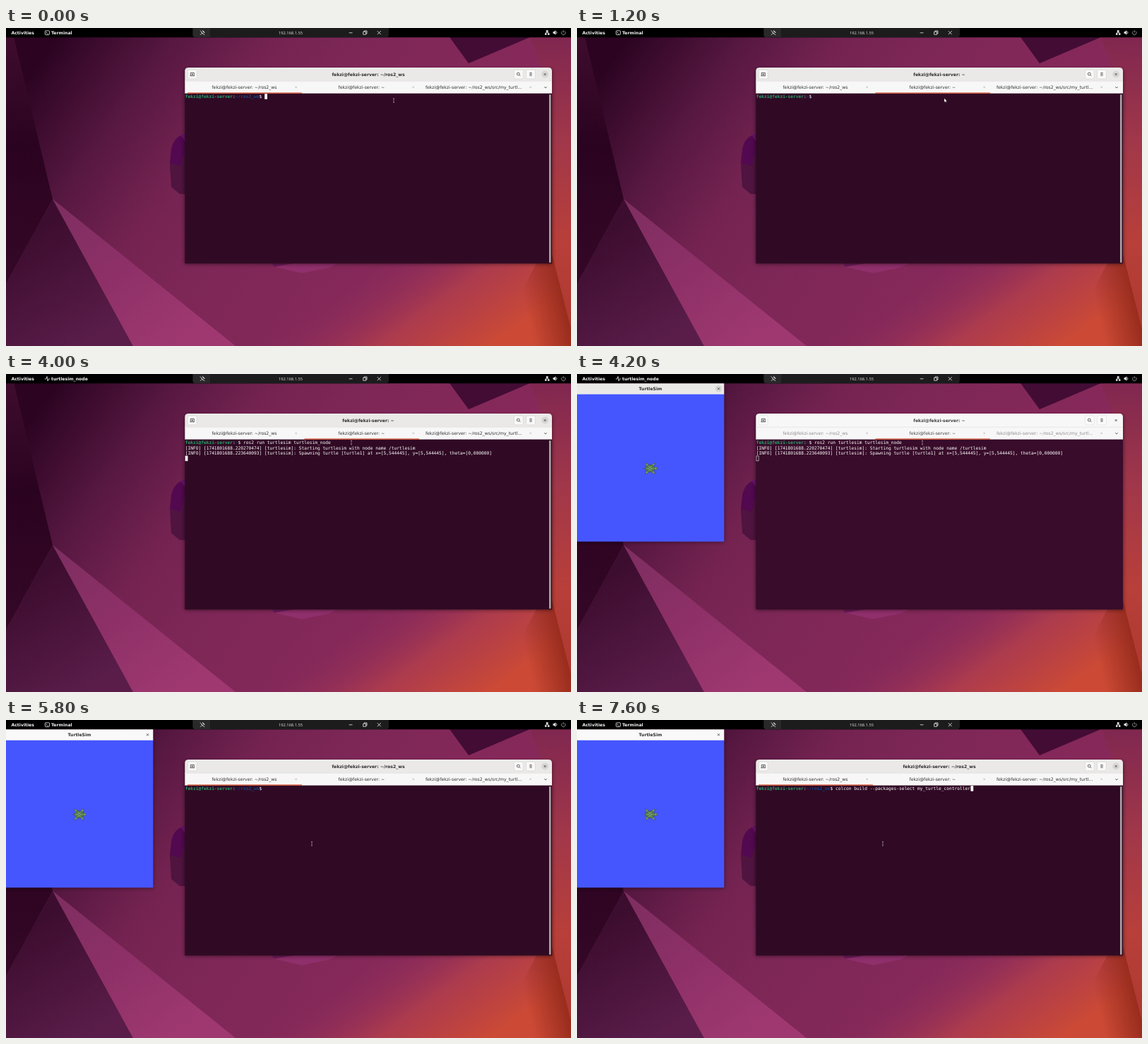
Recreate the animation shown at these times as an HTML page. Size 800 px wide and 450 px high, loop 8000 ms.

```html
<!DOCTYPE html>
<html lang="en">
<head>
<meta charset="utf-8">
<title>Terminal session</title>
<style>
html, body { margin: 0; width: 100%; height: 100%; overflow: hidden; background: #000; }
svg { display: block; width: 800px; height: 450px; }
text { white-space: pre; }
.ui { font: 6.13px "DejaVu Sans", sans-serif; fill: #2e2e2e; }
.bold { font-weight: bold; }
.mid { text-anchor: middle; }
.bar { fill: #f2f2f2; }
.remote { font: 5.7px "Open Sans", sans-serif; fill: #e4e4e4; text-anchor: middle; }
.mono { font: 6.23px "DejaVu Sans Mono", monospace; fill: #fff; }
.user { fill: #26a269; font-weight: bold; }
.path { fill: #12488b; font-weight: bold; }
.line { fill: none; stroke: #3d3d3d; stroke-width: .8; }
.white { fill: none; stroke: #eee; stroke-width: .8; }
.button { fill: #f8f8f8; stroke: #d2d0cf; stroke-width: .6; }
.away .ui { fill: #8d8d8d; }
.away .ui.keep { fill: #444; }
.away .head { fill: #f8f7f7; }
.away .round, .away .scroll { display: none; }
.away .screen { fill: #380c2a; }
.away .button { fill: #fafafa; stroke: #dedede; }
</style>
</head>
<body>
<svg viewBox="0 0 800 450" xmlns="http://www.w3.org/2000/svg">
  <defs>
    <linearGradient id="sky" gradientUnits="userSpaceOnUse" x1="40" y1="60" x2="520" y2="400">
      <stop offset="0" stop-color="#2c0422"/><stop offset=".22" stop-color="#551740"/>
      <stop offset=".42" stop-color="#742351"/><stop offset=".6" stop-color="#7d2757"/>
      <stop offset="1" stop-color="#87295a"/>
    </linearGradient>
    <linearGradient id="glow" gradientUnits="userSpaceOnUse" x1="336" y1="470" x2="447" y2="624">
      <stop offset="0" stop-color="#8d2c5c" stop-opacity="0"/><stop offset=".5" stop-color="#b03d4c" stop-opacity=".9"/>
      <stop offset="1" stop-color="#cc4a35"/>
    </linearGradient>
    <linearGradient id="night" gradientUnits="userSpaceOnUse" x1="0" y1="13" x2="0" y2="350">
      <stop offset="0" stop-color="#3f0c2d"/><stop offset=".45" stop-color="#2a0320"/><stop offset="1" stop-color="#340726"/>
    </linearGradient>
    <linearGradient id="slope" gradientUnits="userSpaceOnUse" x1="20" y1="300" x2="110" y2="450">
      <stop offset="0" stop-color="#3d0d2f"/><stop offset="1" stop-color="#5a1d4a"/>
    </linearGradient>
    <linearGradient id="ray" gradientUnits="userSpaceOnUse" x1="66" y1="242" x2="235" y2="450">
      <stop offset="0" stop-color="#7d2e61"/><stop offset=".5" stop-color="#8d3067"/><stop offset="1" stop-color="#9f3871"/>
    </linearGradient>
    <linearGradient id="ember" gradientUnits="userSpaceOnUse" x1="732" y1="380" x2="786" y2="368">
      <stop offset="0" stop-color="#93291b" stop-opacity="0"/><stop offset="1" stop-color="#93291b" stop-opacity=".9"/>
    </linearGradient>
    <linearGradient id="edge" gradientUnits="userSpaceOnUse" x1="0" y1="13" x2="0" y2="425">
      <stop offset="0" stop-color="#802750"/><stop offset=".35" stop-color="#a0374a"/>
      <stop offset=".7" stop-color="#b83f3a"/><stop offset="1" stop-color="#ae3930"/>
    </linearGradient>
    <filter id="soft" x="-10%" y="-10%" width="120%" height="125%"><feGaussianBlur stdDeviation="2.5"/></filter>
    <path id="cross" class="line" d="M-1.5-1.5 1.5 1.5M1.5-1.5-1.5 1.5"/>
    <path id="leg" d="M2-3.5Q3-8 7-7.5Q5.5-4 4-2Z"/>
  </defs>

  <g id="wallpaper">
    <rect width="800" height="450" fill="url(#sky)"/>
    <rect width="800" height="450" fill="url(#glow)"/>
    <path d="M0 0H8L66 242 0 362Z" fill="url(#night)"/>
    <path d="M66 242 0 362V450H180Z" fill="url(#slope)"/>
    <path d="M66 242 180 450H325Z" fill="url(#ray)"/>
    <path d="M628 13 655 50 742 13Z" fill="#430c35"/>
    <path d="M742 13H800V425L768 300 760 60Z" fill="url(#edge)"/>
    <path d="M690 450 768 300 800 425V450Z" fill="url(#ember)"/>
    <path d="M232 191 234 172Q237 156 248 152L260 150V200Z" fill="#52094f"/>
    <path d="M232 191 247 195 260 150V235H246L234 225Z" fill="#4f143f"/>
    <path d="M247 151 260 148V170Z" fill="#6b146a"/>
    <path d="M376 333H470L458 339 419 347 380 338Z" fill="#8f2f6b"/>
    <path d="M376 333H408L380 338Z" fill="#6c1b59"/>
  </g>

  <rect width="800" height="13.3" fill="#000"/>
  <text class="ui bold bar" x="7.5" y="8.9">Activities</text>
  <g id="appTerm">
    <rect class="white" x="55.3" y="3.8" width="6.2" height="5.8" rx="1"/>
    <path class="white" d="M56.7 5.3 58 6.5 56.7 7.7M58.6 8.1H60"/>
    <text class="ui bold bar" x="64" y="8.9">Terminal</text>
  </g>
  <g id="appSim">
    <path class="white" d="M54.8 7H56.8L58 3.5 59.2 10 60.2 7H62"/>
    <text class="ui bold bar" x="64" y="8.9">turtlesim_node</text>
  </g>
  <path d="M264.5 0H542V9Q542 13.3 537.5 13.3H269Q264.5 13.3 264.5 9Z" fill="#1c1c1c"/>
  <path d="M264.5 0H289V13.3H269Q264.5 13.3 264.5 9Z" fill="#292929"/>
  <path class="white" d="M274.8 3.5 281.2 10M275 9.8 277 7.8M276.2 6 279 8.8M278 4 281 7M278.5 3.5 281.5 6.3"/>
  <text class="remote" x="403" y="8.8">192.168.1.55</text>
  <path class="white" d="M485.7 6.8H490.5M525.8 4.2 530.8 9.2M530.8 4.2 525.8 9.2" stroke-width="1"/>
  <path class="white" d="M505.7 5.3H509.6V9.2H505.7ZM507 5V4H511V8H510"/>
  <g fill="#eee">
    <path d="M764.8 3.3H767.6V5.8H764.8ZM763 7.5H765.5V9.8H763ZM767 7.5H769.5V9.8H767Z"/>
    <path d="M774.5 5.3H776L778.3 3.3V9.8L776 7.8H774.5Z"/>
  </g>
  <path class="white" d="M766.2 5.5V6.7M764.2 7.7V6.7H768.2V7.7M779.3 4.8Q780.6 6.5 779.3 8.3" stroke-width=".6"/>
  <path class="white" d="M787.6 4.6A2.8 2.8 0 1 0 791 4.6M789.3 3.2V6.3" style="stroke:#aaa"/>

  <g id="sim">
    <rect x="-4" y="15" width="213" height="223.5" fill="#000" opacity=".35" filter="url(#soft)"/>
    <rect id="simHead" y="13.3" width="208.3" height="16"/>
    <rect y="28.7" width="208.3" height="208.5" fill="#4556ff"/>
    <text class="ui bold mid" x="104" y="23">TurtleSim</text>
    <circle id="simClose" cx="200.5" cy="20.8" r="4.8" fill="#d8d7d6"/>
    <use href="#cross" x="200.5" y="20.8"/>
    <g transform="translate(103.5 133.7)" fill="#7f9b6c" stroke="#33492f" stroke-width=".5">
      <use href="#leg"/>
      <use href="#leg" transform="scale(1 -1)"/>
      <use href="#leg" transform="scale(-1 1)"/>
      <use href="#leg" transform="scale(-1 -1)"/>
      <path d="M-6-1-9 0-6 1Z"/>
      <ellipse cx="7.3" rx="2.6" ry="2.1"/>
      <ellipse rx="6.5" ry="5" fill="#4f7a4b"/>
      <path d="M-3-4 0-1.7 3-4M-3 4 0 1.7 3 4M0-1.7-2.5 0 0 1.7 2.5 0ZM-6 0H-2.5M2.5 0H6" fill="none" stroke="#b3c59b"/>
    </g>
  </g>

  <g id="term">
    <rect x="252.3" y="58" width="521.7" height="276.5" rx="4" fill="#000" opacity=".4" filter="url(#soft)"/>
    <path class="head" d="M253.3 76V61Q253.3 56 258.3 56H768Q773 56 773 61V76Z" fill="#ebe9e8"/>
    <rect x="253.3" y="75.2" width="519.7" height="17.6" fill="#f8f7f7"/>
    <path d="M253.3 75.2H773" stroke="#d9d7d5" stroke-width=".5"/>
    <rect class="button" x="257.3" y="59" width="13" height="13" rx="2.2"/>
    <rect class="button" x="719.3" y="59" width="13" height="13" rx="2.2"/>
    <rect class="button" x="736.5" y="59" width="13" height="13" rx="2.2"/>
    <path class="line" d="M261.3 67.7V63.3H266.3V67.7M260.5 67.7H267M263.8 64.3V67M262.5 65.7H265.1" stroke-width=".7"/>
    <circle class="line" cx="725.3" cy="65" r="1.9"/>
    <path class="line" d="M726.7 66.4 728.4 68.1M741.3 63.6H744.7M741.3 65.4H744.7M741.3 67.2H744.7M762.2 83.2 764 85 765.8 83.2"/>
    <circle class="round" cx="763.2" cy="65.5" r="5" fill="#d8d6d5"/>
    <use href="#cross" x="763.2" y="65.5"/>
    <text class="ui bold mid keep" id="title" x="513" y="67.7"></text>
    <g id="tabs"></g>
    <rect class="screen" x="253.3" y="92.7" width="519.7" height="240.6" fill="#300a24"/>
    <rect id="underline" y="91.4" height="1.4" fill="#c9492c"/>
    <rect class="scroll" x="769" y="94" width="2.6" height="238.3" rx="1.3" fill="#aaa3a7"/>
    <g id="rows"></g>
    <rect id="caret"/>
  </g>

  <path id="beam" d="M-1-2.8H1M0-2.8V2.8M-1 2.8H1" fill="none" stroke="#d8d0d6" stroke-width=".5"/>
  <path id="arrow" d="M0 0V5.4L1.3 4.3 2.1 6 3 5.6 2.2 3.9H3.9Z" fill="#fff" stroke="#222" stroke-width=".3"/>
</svg>
<script>
const LOOP = 8000, CELL = 3.75, ROW = 7.5, LEFT = 253.7;
const HOST = 'fekzi@fekzi-server';
const RUN = 'ros2 run turtlesim turtlesim_node';
const BUILD = 'colcon build --packages-select my_turtle_controller';
const LOG = [
  '[INFO] [1741801688.220270474] [turtlesim]: Starting turtlesim with node name /turtlesim',
  '[INFO] [1741801688.223640093] [turtlesim]: Spawning turtle [turtle1] at x=[5,544445], y=[5,544445], theta=[0,000000]'
];
const TABS = [
  { dir: '~/ros2_ws', x: 337.5, bar: [257, 162] },
  { dir: '~', x: 503.3, bar: [422.5, 162.5] },
  { dir: '~/ros2_ws/src/my_turtl…', x: 662.3 }
];

// Each step changes part of the state and holds until the next one.
const STEPS = [
  [0, { tab: 0, cmd: '', log: 0, caret: 1, app: 'term', sim: 0, away: 0, mouse: [549, 102.5], arrow: 0 }],
  [200, { mouse: [530, 91], arrow: 1 }],
  [400, { mouse: [517, 84] }],
  [800, { tab: 1 }],
  [1200, { caret: 0, mouse: [520, 99.5] }],
  [1400, { caret: 1, mouse: [512, 99], arrow: 0 }],
  [1600, { mouse: [500, 98] }],
  [1800, { mouse: [492, 97] }],
  [2000, { caret: 0, mouse: [489, 97] }],
  [2600, { caret: 1 }],
  [2800, { cmd: RUN }],
  [3000, { caret: 0 }],
  [3600, { caret: 1 }],
  [3800, { log: 1 }],
  [4000, { log: 3, app: 'sim' }],
  [4200, { sim: 1, away: 1 }],
  [4800, { mouse: [440, 92], arrow: 1 }],
  [5000, { mouse: [362, 84] }],
  [5200, { tab: 0, cmd: '', log: 0, app: 'term', away: 0 }],
  [5400, { mouse: [395, 128], arrow: 0 }],
  [5600, { mouse: [433, 175] }],
  [5800, { caret: 0 }],
  [6200, { caret: 1 }],
  [6800, { caret: 0 }],
  [7400, { caret: 1 }],
  [7600, { cmd: BUILD }]
];

const $ = id => document.getElementById(id);
const show = (id, on) => { $(id).style.display = on ? '' : 'none'; };
const set = (node, attrs) => { for (const k in attrs) node.setAttribute(k, attrs[k]); };
const span = (cls, text) => `<tspan class="${cls}">${text}</tspan>`;
const row = (n, html) => `<text class="mono" x="${LEFT}" y="${99 + n * ROW}">${html}</text>`;

$('tabs').innerHTML = TABS.map(({ dir, x }, i) =>
  `<text class="ui mid" id="tab${i}" x="${x}" y="86.2">${HOST}: ${dir}</text>` +
  `<use href="#cross" transform="translate(${410.7 + i * 166} 83.8) scale(.8)" opacity=".4"/>`).join('');

function draw(s) {
  const { dir, bar } = TABS[s.tab];
  $('title').textContent = `${HOST}: ${dir}`;
  TABS.forEach((_, i) => $('tab' + i).classList.toggle('keep', i === s.tab));
  set($('underline'), { x: bar[0], width: bar[1] });
  $('term').setAttribute('class', s.away ? 'away' : '');

  const prompt = span('user', HOST) + ':' + span('path', dir) + '$ ' + s.cmd;
  const lines = [prompt, ...LOG.slice(0, Math.max(0, s.log - 1))];
  $('rows').innerHTML = lines.map((html, n) => row(n, html)).join('');

  const col = s.log ? 0 : HOST.length + dir.length + 3 + s.cmd.length;
  const inset = s.away ? .3 : 0;
  set($('caret'), {
    x: LEFT + col * CELL + inset, y: 93.2 + s.log * ROW + inset,
    width: CELL - inset * 2, height: ROW - inset * 2,
    fill: s.away ? 'none' : '#fff', stroke: s.away ? '#eee' : 'none', 'stroke-width': .6
  });
  show('caret', s.caret);

  show('appTerm', s.app === 'term');
  show('appSim', s.app === 'sim');
  show('sim', s.sim);
  show('simClose', s.away);
  $('simHead').setAttribute('fill', s.away ? '#ebe9e8' : '#faf9f9');

  show('arrow', s.arrow);
  show('beam', !s.arrow);
  $(s.arrow ? 'arrow' : 'beam').setAttribute('transform', `translate(${s.mouse})`);
}

let last = -1;
function tick() {
  const t = performance.now() % LOOP;
  const past = STEPS.filter(([at]) => at <= t);
  if (past.length !== last) {
    last = past.length;
    draw(Object.assign({}, ...past.map(([, change]) => change)));
  }
  requestAnimationFrame(tick);
}
tick();
</script>
</body>
</html>
```
